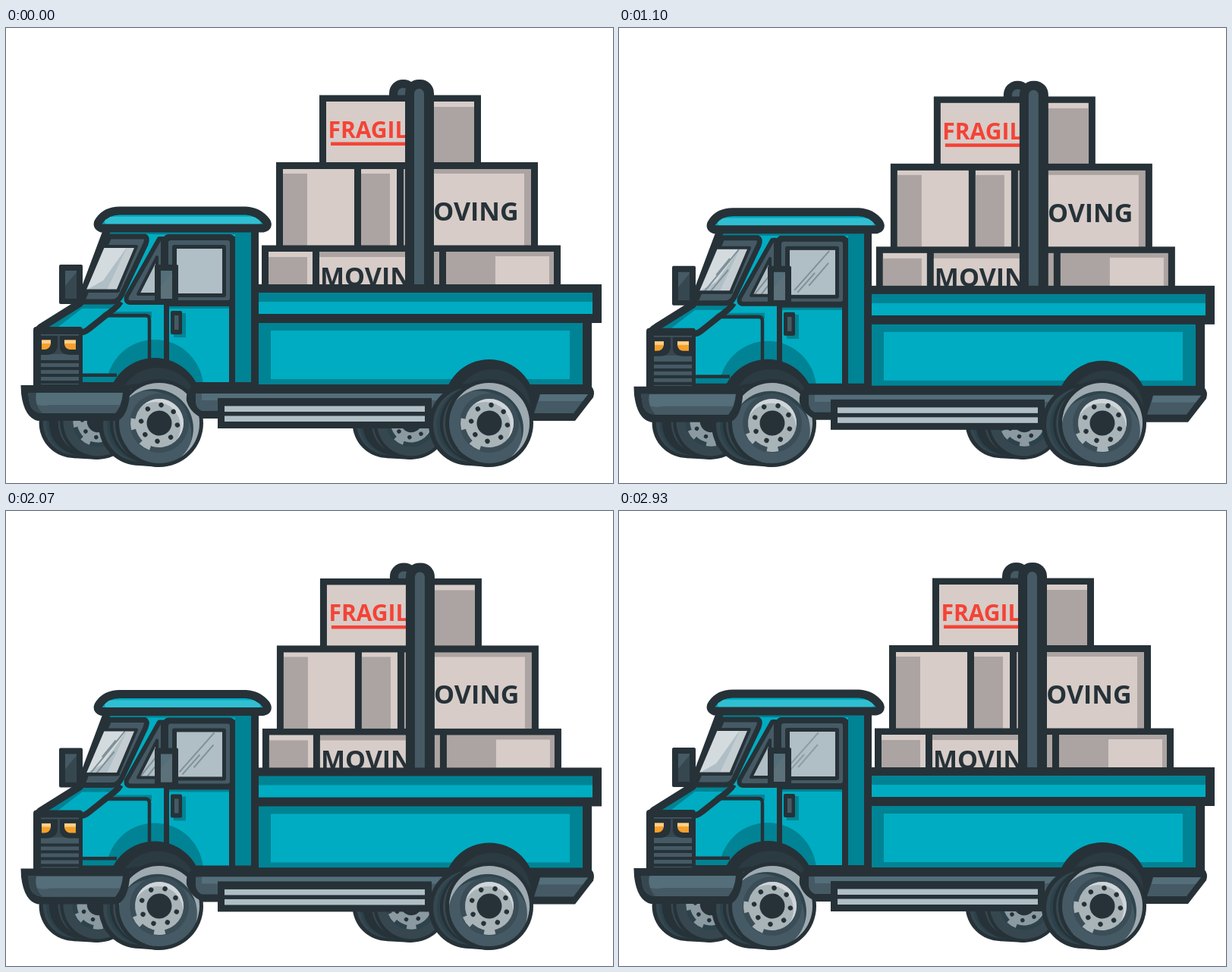
These frames come from a looping animation (800 by 600 pixels, 3.03 s). An HTML page with a canvas:

```html
<!DOCTYPE html>
<html lang="en">
<head>
<meta charset="utf-8">
<title>Moving truck</title>
<style>
html, body { margin: 0; width: 100%; height: 100%; overflow: hidden; background: #fff; }
canvas { display: block; width: 800px; height: 600px; }
</style>
</head>
<body>
<canvas id="stage" width="800" height="600"></canvas>
<script>
const ctx = document.getElementById('stage').getContext('2d');
const LOOP = 3030, STEP = 88.7, LAST = 33;
const INK = '#263238', SLATE = '#455a64', STEEL = '#546e7a', SHADE = '#37474f';
const TEAL = '#00acc1', DEEP = '#008394', SKY = '#30bfd2', GLASS = '#b0bec5', PALE = '#d3dbde';
const CARD = '#d7ccc8', CARD_DARK = '#aca4a2', RED = '#f44336';
const TAU = Math.PI * 2, RAD = Math.PI / 180;

// time, body y, load x, load y
const BOUNCE = [
  [0, 0, 0, 0], [90, -.6, 0, -1], [280, -5.5, 3, -9], [460, 1.5, 1.5, 2], [650, .5, .7, .6],
  [880, -.3, -.3, -.6], [1100, 2, 2, 2], [1280, 0, 0, 0], [1450, .5, .7, .5],
  [1800, -.6, -.6, -.8], [2000, .8, .8, 1], [2260, -5.6, 3, -9], [2330, -5.4, 3, -8.3],
  [2550, 1.5, 1.5, 2], [2930, 0, 0, 0]
];
// time, glare strength, glare x
const GLARE = [
  [0, 0, 0], [560, 0, 8], [650, .35, 8], [830, 1, 4], [1100, 1, 0], [1190, 1, 0], [1370, 0, 0],
  [1530, 0, 4], [1710, 1, 4], [1800, 1, 3], [2330, 1, -10], [2840, .8, -13], [2930, .7, -14]
];

function sample(keys, t) {
  let i = 1;
  while (i < keys.length - 1 && keys[i][0] < t) i++;
  const a = keys[i - 1], b = keys[i];
  const p = Math.min(1, Math.max(0, (t - a[0]) / (b[0] - a[0])));
  const e = (1 - Math.cos(p * Math.PI)) / 2;
  return a.slice(1).map((v, n) => v + (b[n + 1] - v) * e);
}

// Rectangle by its edges
function box(l, t, r, b, color, radius = 0) {
  ctx.fillStyle = color;
  if (!radius) return ctx.fillRect(l, t, r - l, b - t);
  ctx.beginPath();
  ctx.roundRect(l, t, r - l, b - t, radius);
  ctx.fill();
}

function shape(d, fill, stroke, width = 5) {
  const p = new Path2D(d);
  if (fill) { ctx.fillStyle = fill; ctx.fill(p); }
  if (stroke) { ctx.strokeStyle = stroke; ctx.lineWidth = width; ctx.stroke(p); }
}

function disc(x, y, r, color, from = 0, to = TAU) {
  ctx.fillStyle = color;
  ctx.beginPath();
  ctx.arc(x, y, r, from, to);
  ctx.fill();
}

function clipped(d, draw) {
  ctx.save();
  ctx.clip(new Path2D(d));
  draw();
  ctx.restore();
}

function shifted(x, y, draw) {
  ctx.save();
  ctx.translate(x, y);
  draw();
  ctx.restore();
}

function label(text, x, y, size, color, align = 'left') {
  ctx.font = `bold ${size}px "Open Sans", sans-serif`;
  ctx.textAlign = align;
  ctx.fillStyle = color;
  ctx.fillText(text, x, y);
}

// Crescent on the +x side of a disc
function crescent(r, cut, shift, color) {
  ctx.save();
  ctx.beginPath();
  ctx.arc(0, 0, r, 0, TAU);
  ctx.clip();
  ctx.beginPath();
  ctx.rect(-r, -r, 2 * r, 2 * r);
  ctx.arc(-shift, 0, cut, 0, TAU);
  ctx.fillStyle = color;
  ctx.fill('evenodd');
  ctx.restore();
}

function tread(depth) {
  disc(-depth, 2, 54, INK);
  shape(`M${-depth} -52 L0 -58 L0 58 L${-depth} 56 Z`, INK);
  disc(1 - depth, 2, 49, SHADE);
  disc(7 - depth, 2, 50, '#2b424b');
  disc(12 - depth, 1, 51, INK);
  disc(-10, 1, 51, SHADE);
}

function rim(metal, shine) {
  disc(0, 0, 32, metal);
  ctx.save();
  ctx.rotate(165 * RAD);
  crescent(32, 33, 7, shine);
  ctx.restore();
  ctx.fillStyle = metal;
  for (const side of [-1, 1]) {
    const mid = side * 28 * RAD;
    ctx.beginPath();
    ctx.arc(0, 0, 38, mid - 12 * RAD, mid + 12 * RAD);
    ctx.arc(0, 0, 24, mid + 12 * RAD, mid - 12 * RAD, true);
    ctx.fill();
  }
  for (let i = 0; i < 8; i++) {
    const a = (i * 45 - 9) * RAD;
    disc(Math.cos(a) * 24, Math.sin(a) * 24, 3.2, INK);
  }
  disc(0, 0, 16.5, INK);
}

function wheel(x, y, turn, near) {
  ctx.save();
  ctx.translate(x, y);
  if (!near) ctx.scale(.86, .86);
  tread(near ? 26 : 36);
  disc(0, 0, 58, INK);
  disc(0, 0, 53, near ? SLATE : SHADE);
  ctx.rotate(turn);
  ctx.save();
  ctx.rotate(165 * RAD);
  crescent(53, 58, 22, '#2f454e');
  if (near) crescent(53, 52, 10, '#9eaab0');
  ctx.restore();
  disc(0, 0, 39, near ? '#3b4e58' : '#2d434c');
  if (near) rim('#a9b4b9', '#cfd5d8');
  else rim('#8b9aa1', '#a9b4b9');
  ctx.restore();
}

function load() {
  // rear pole
  box(505, 68, 542, 110, INK, 18);
  box(516, 79, 531, 110, SLATE, 7);

  // top row
  box(413, 88.5, 626, 186, INK);
  box(422, 97, 617, 178, CARD);
  box(545, 104, 617, 178, CARD_DARK);
  label('FRAGILE', 424.5, 145, 30, RED);
  box(428, 150.5, 545, 155, RED);

  // middle row
  box(356, 177, 701, 295, INK);
  box(365, 186, 459, 287, CARD);
  box(365, 192, 397, 287, CARD_DARK);
  box(468, 186, 515, 287, CARD);
  box(468, 192, 506, 287, CARD_DARK);
  box(524, 186, 530, 287, CARD_DARK);
  box(550, 186, 692, 287, CARD_DARK);
  box(550, 192, 683, 287, CARD);
  label('MOVING', 675.5, 254, 34, INK, 'right');

  // bottom row
  box(337, 286.5, 731, 360, INK);
  box(346, 295, 404, 360, CARD);
  box(346, 302, 397, 360, CARD_DARK);
  box(413, 295, 571, 360, CARD_DARK);
  box(413, 302, 564, 360, CARD);
  box(580, 295, 722, 360, CARD_DARK);
  box(645, 301, 716, 360, CARD);
  label('MOVING', 414, 339.5, 34, INK);

  // front pole
  box(526, 68, 564, 365, INK, 18);
  box(538, 80, 551, 365, SLATE, 6.5);
}

function bed() {
  box(322, 380, 772, 482, INK);
  box(333, 388, 760, 470, DEEP);
  box(349, 399, 743, 463, TEAL);
  box(327, 338, 785, 389, INK);
  box(333, 349, 773, 377, DEEP);
  box(333, 361, 773, 377, TEAL);
}

function streaks(strength, dx, lines) {
  if (strength <= 0) return;
  ctx.save();
  ctx.globalAlpha = strength;
  ctx.translate(dx, 0);
  shape(lines, null, '#819097', 2);
  ctx.restore();
}

function windows([glare, dx]) {
  const strong = Math.max(0, Math.min(1, (glare - .75) * 4));

  // windscreen
  shape('M136 275 H183 Q187 277 184 285 L152 353 Q148 361 140 361 H100 Z', SLATE, INK, 7);
  const pane = 'M128 288 H172 L147 347 H103 Z';
  shape(pane, GLASS);
  clipped(pane, () => {
    shape('M128 288 H160 L128 333 L103 347 Z', PALE);
    shape('M172 288 L147 347 H132 L160 288 Z', '#c4cdd1');
    streaks(strong, dx * .5, 'M112 346 L158 290 M120 346 L144 317 M128 324 L146 302');
  });
  shape(pane, null, INK, 4);
  box(104, 344.5, 150, 348, INK);

  // quarter light
  shape('M202 278 L159 354 Q157 362 164 362 H207 V278 Z', SLATE, INK, 6);
  const quarter = 'M199 302 V351 H174 Z';
  shape(quarter, GLASS);
  clipped(quarter, () => streaks(strong, dx * .4, 'M178 350 L202 320 M187 350 L205 327'));
  shape(quarter, null, INK, 4);

  // door window
  box(207, 272, 302, 367, INK, 7);
  box(214, 280, 295, 359, SLATE, 3);
  box(219, 286, 290, 355, INK, 3);
  box(225, 291, 285, 350, GLASS);
  clipped('M225 291 H285 V350 H225 Z', () => streaks(glare, dx,
    'M231 344 L277 292 M235 347 L258 321 M250 338 L276 308'));
}

function mirror(l, r, fill, fold) {
  box(l, 312, r, 364, INK, 2);
  box(l + 8, 320, r - 8, 357, fill);
  shape(`M${l + 8} 357 V340 L${r - 8} 322 V357 Z`, fold);
}

function grille() {
  box(36, 394, 101, 474, INK, 4);
  box(46, 404, 96, 470, SLATE);
  box(46, 405, 96, 430, SHADE);
  shape('M43 406 H68 V420 Q66 431 54 431 H46 Z M71 406 H97 V431 H83 Q71 430 71 420 Z', INK);
  shape('M47 411.5 H59 V417 Q57 424 51 424 H47 Z', '#f5a02c');
  shape('M77 411.5 H92 V424 H84 Q78 423 77 417 Z', '#f5a02c');
  box(47, 411.5, 59, 416, '#ffd08a');
  box(77, 411.5, 92, 416, '#ffd08a');
  for (let y = 438; y < 470; y += 9) box(46, y, 96, y + 4, INK);
}

function cab(glare) {
  const shell = 'M134 264 H328 V472 H41 V404 Q41 397 49 393 L97 363 Z';
  shape(shell, TEAL);
  clipped(shell, () => {
    box(302, 264, 324, 472, DEEP);
    box(130, 264, 324, 272, DEEP);
    shape('M40 400 L98 360 H150 L140 370 H100 L64 398 Z', DEEP);
    shape('M105 398 L130 374 H192 V382 H132 L104 404 Z', DEEP);
    disc(196, 475, 64, DEEP);
    box(101, 456, 145, 472, DEEP);
  });
  shape(shell, null, INK, 10);

  // hood and fender seams
  shape('M151 361 Q148 366 143 370 L109 397 Q103 402 95 402 H46', null, INK, 8);
  shape('M128 379 H184 Q189 379 189 385 V440', null, INK, 4.5);
  box(101, 455.5, 146, 460, INK);

  // door
  box(208, 276, 215, 442, INK);
  box(294, 275, 302, 472, INK);
  box(215, 367, 294, 370, DEEP);
  box(221, 376, 237, 408, DEEP);
  box(217, 373, 232, 404, INK, 2);
  box(222, 379, 227.5, 398, SLATE);

  windows(glare);
  mirror(70, 101, SLATE, SHADE);
  mirror(196, 227, STEEL, '#5d717b');
  grille();

  // roof
  const roof = 'M126 264 Q118 261 123 254 Q132 241 150 241 H316 Q333 242 343 255 Q347 262 339 264 Z';
  shape(roof, TEAL);
  clipped(roof, () => box(130, 249, 336, 260, SKY, 6));
  shape(roof, null, INK, 11);
}

function arch(x, r) {
  disc(x, 497, r, INK, Math.PI, TAU);
  disc(x + 4, 500, r - 10, '#2c3a41', Math.PI, TAU);
}

function bumper() {
  shape('M19.5 471 H163 V485 Q160 512 147 518 H42 Q24 514 20 482 Z', INK);
  shape('M29 481 H154 Q153 497 144 508 H48 Q34 507 31 494 Z', STEEL);
  shape('M31 494 Q48 500 58 497 H151 L144 508 H48 Q34 507 31 494 Z', SLATE);
  shape('M29 481 H40 Q37 497 48 508 Q34 507 31 494 Z', SHADE);
}

function sill() {
  shape('M252 470 H600 V515 H260 Q243 508 238 492 Q236 474 252 470 Z', INK);
  shape('M250 482 H590 V505 H258 Q251 502 250 494 Z', SLATE);
  box(258, 482, 590, 491, STEEL);
}

function tail() {
  shape('M690 472 H771 Q777 478 774 487 L750 518 H690 Z', INK);
  shape('M704 483 H767 L748 508 H696 Z', SLATE);
  shape('M704 483 H767 L760 492 H702 Z', STEEL);
}

function step() {
  box(279, 488, 561, 528, INK);
  box(288, 498.5, 552, 506, GLASS);
  box(288, 511.5, 552, 519, GLASS);
}

function draw(frame) {
  const t = frame * STEP;
  const [bodyY, loadX, loadY] = sample(BOUNCE, t);
  const glare = sample(GLARE, t);
  const turn = (150 - 1080 * frame / LAST) * RAD;
  const onBody = part => shifted(0, bodyY, part);

  ctx.fillStyle = '#fff';
  ctx.fillRect(0, 0, 800, 600);
  ctx.lineJoin = 'round';

  wheel(121, 519, turn, false);
  wheel(534, 519, turn, false);
  shifted(loadX, loadY, load);
  onBody(() => {
    bed();
    cab(glare);
    arch(196, 62);
  });
  wheel(202, 521, turn, true);
  onBody(() => {
    bumper();
    sill();
    tail();
    arch(637, 60);
  });
  wheel(637, 521, turn, true);
  onBody(step);
}

const start = performance.now();
function tick() {
  const t = (performance.now() - start) % LOOP;
  draw(Math.min(LAST, Math.floor(t / STEP)));
  requestAnimationFrame(tick);
}
tick();
</script>
</body>
</html>
```
